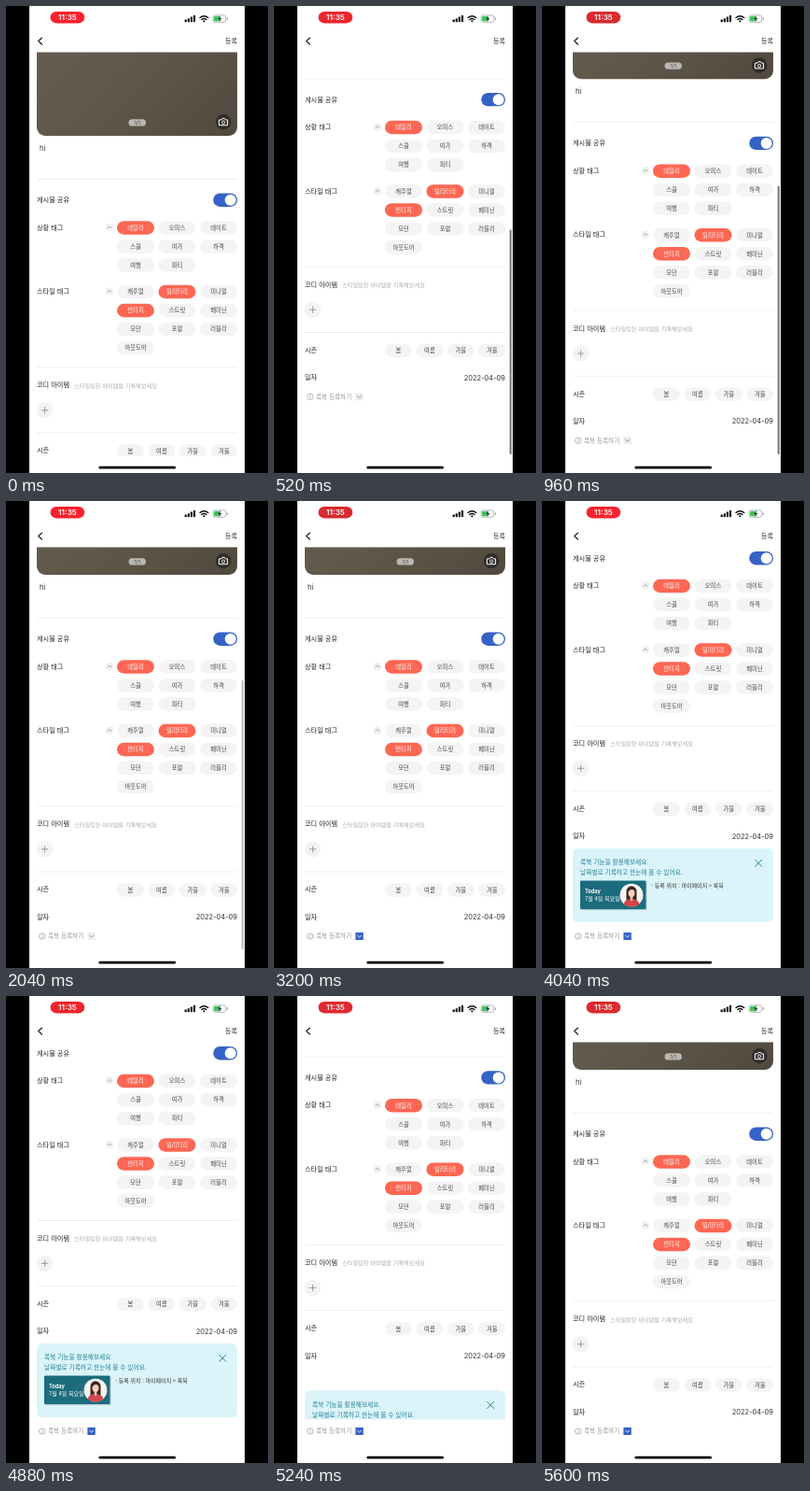
An HTML page for the animation above (5680 ms loop, 281 by 500 pixels).

```html
<!DOCTYPE html>
<html lang="ko">
<head>
<meta charset="utf-8">
<title>등록</title>
<style>
html, body { margin: 0; width: 100%; height: 100%; overflow: hidden; background: #000; }
svg { display: block; width: 100vw; height: 100vh; }
text { font-family: "Noto Sans CJK KR", "Noto Sans CJK", "Noto Sans", sans-serif; white-space: pre; }
text.latin { font-family: Inter, Roboto, sans-serif; }
</style>
</head>
<body>
<svg id="stage" viewBox="0 0 281 500">
  <defs>
    <linearGradient id="photo" x1="0" y1="0" x2="1" y2="1">
      <stop offset="0" stop-color="#6a6254"/>
      <stop offset=".6" stop-color="#5f574a"/>
      <stop offset="1" stop-color="#51493d"/>
    </linearGradient>
    <clipPath id="viewport"><rect x="25" y="49.5" width="231" height="432.5"/></clipPath>
    <clipPath id="fold"><rect id="foldBox" x="25" y="306" width="231" height="0"/></clipPath>
    <clipPath id="face"><circle cx="96" cy="50" r="12.6"/></clipPath>
  </defs>
</svg>
<script>
const LOOP = 5680;
const PANEL = 86.5;
const REST = 147.5;
const NS = 'http://www.w3.org/2000/svg';
const stage = document.getElementById('stage');
const foldBox = document.getElementById('foldBox');

function el(parent, tag, attrs = {}) {
  const node = document.createElementNS(NS, tag);
  for (const key in attrs) node.setAttribute(key, attrs[key]);
  return parent.appendChild(node);
}
const rect = (p, x, y, width, height, fill, rx = 0) =>
  el(p, 'rect', { x, y, width, height, fill, rx });
const circle = (p, cx, cy, r, fill) => el(p, 'circle', { cx, cy, r, fill });
const stroke = (p, d, color, width = 1) => el(p, 'path', {
  d, fill: 'none', stroke: color, 'stroke-width': width,
  'stroke-linecap': 'round', 'stroke-linejoin': 'round'
});
// y is the vertical centre of the glyphs
function label(p, x, y, str, size, fill = '#222', opts = {}) {
  const node = el(p, 'text', { x, y: y + size * 0.37, 'font-size': size, fill, ...opts });
  node.textContent = str;
  return node;
}
const MID = { 'text-anchor': 'middle' };
const END = { 'text-anchor': 'end' };
const BOLD = { 'font-weight': 500 };
const LATIN = { class: 'latin' };

function pill(p, x, y, w, str, on) {
  rect(p, x, y - 7.2, w, 14.4, on ? '#fd6753' : '#f4f4f5', 7.2);
  label(p, x + w / 2, y, str, 6.3, on ? '#fff' : '#444', MID);
}
const divider = (p, y) => rect(p, 33, y - 0.4, 215, 0.8, '#ececec');

function tagGroup(p, y, title, tags, chosen) {
  label(p, 33, y - 0.5, title, 7.2, '#222', BOLD);
  circle(p, 111, y - 0.5, 4.3, '#f1f1f2');
  stroke(p, `M109 ${y + 0.4}l2-1.9l2 1.9`, '#888', 0.7);
  tags.forEach((tag, i) =>
    pill(p, 119 + (i % 3) * 44.5, y + Math.floor(i / 3) * 20, 40, tag, chosen.includes(tag)));
}

// Phone screen
rect(stage, 25, 0, 231, 500, '#fff');
const view = el(stage, 'g', { 'clip-path': 'url(#viewport)' });
const list = el(view, 'g');

// Photo and caption
rect(list, 33, -284, 215, 215.5, 'url(#photo)', 9);
rect(list, 131.5, -86.3, 18.5, 7.4, '#b9b7b3', 3.7);
label(list, 140.7, -82.6, '1/1', 5.4, '#4a4742', { ...MID, ...LATIN });
circle(list, 233.2, -83.2, 8.2, '#2f2d2a');
stroke(list, 'M228.8-85.6h2.2l1-1.5h2.4l1 1.5h2.2v5.8h-8.8z', '#fff', 1);
el(list, 'circle', { cx: 233.2, cy: -82.9, r: 1.6, fill: 'none', stroke: '#fff', 'stroke-width': 0.9 });
label(list, 36, -55.5, 'hi', 7.6, '#333', LATIN);
divider(list, -22);

// Share switch
label(list, 33, 0, '게시물 공유', 7.2, '#222', BOLD);
rect(list, 222.3, -7, 25.7, 14.4, '#3562c6', 7.2);
circle(list, 240.7, 0.2, 6, '#fff');

tagGroup(list, 30, '상황 태그',
  ['데일리', '오피스', '데이트', '스쿨', '여가', '하객', '여행', '파티'], ['데일리']);
tagGroup(list, 98.5, '스타일 태그',
  ['캐주얼', '밀리터리', '미니멀', '빈티지', '스트릿', '페미닌', '모던', '포멀', '러블리', '아웃도어'],
  ['밀리터리', '빈티지']);
divider(list, 179.3);

// Items, season, date
label(list, 33, 198.3, '코디 아이템', 7.2, '#222', BOLD);
label(list, 73, 199, '스타일링한 아이템을 기록해보세요', 6.2, '#aaa');
circle(list, 41.6, 225.3, 8.7, '#f3f3f4');
stroke(list, 'M38.4 225.3h6.4M41.6 222.1v6.4', '#888', 0.8);
divider(list, 249.5);
label(list, 33, 268.3, '시즌', 7.2, '#222', BOLD);
['봄', '여름', '가을', '겨울'].forEach((s, i) => pill(list, 119 + i * 33.4, 269, 29, s));
label(list, 33, 297.8, '일자', 7.2, '#222', BOLD);
label(list, 248, 298, '2022-04-09', 7.5, '#333', { ...END, ...LATIN });

// Folding hint panel
const fold = el(list, 'g', { 'clip-path': 'url(#fold)' });
const panel = el(fold, 'g');
rect(panel, 33, 0, 215, 79, '#daf4fa', 5.5);
label(panel, 41, 15, '룩북 기능을 활용해보세요.', 6.7, '#267f92');
label(panel, 41, 26, '날짜별로 기록하고 한눈에 볼 수 있어요.', 6.7, '#267f92');
stroke(panel, 'M228.7 12.2l7 7M235.7 12.2l-7 7', '#267f92', 1);
rect(panel, 41.5, 35.2, 71, 31, '#b3ced5', 1);
rect(panel, 41, 34.5, 70.5, 30.5, '#1c6c7d', 1);
label(panel, 46, 46, 'Today', 5.6, '#fff', { 'font-weight': 700, ...LATIN });
label(panel, 46, 54, '7월 4일 목요일', 6, '#fff', BOLD);
const avatar = el(panel, 'g', { 'clip-path': 'url(#face)' });
circle(avatar, 96, 50, 12.6, '#f7f4f0');
el(avatar, 'path', { d: 'M90.5 58V46a5.5 5.8 0 0 1 11 0V58z', fill: '#3a2425' });
el(avatar, 'path', { d: 'M87 64q0-9 6-9.6h6q6 .6 6 9.6z', fill: '#d2474b' });
rect(avatar, 94.6, 50, 2.8, 6, '#efc2a6', 1.2);
el(avatar, 'ellipse', { cx: 96, cy: 47.6, rx: 3.5, ry: 4.4, fill: '#f6d0b6' });
el(avatar, 'path', { d: 'M92 47q.3-5 4-5t4 5q-1-3-3.5-3.2Q94 44 92 47z', fill: '#3a2425' });
label(panel, 117, 40, '- 등록 위치 : 마이페이지 > 룩북', 6, '#333');

// Lookbook row
const row = el(list, 'g');
el(row, 'circle', { cx: 38.8, cy: 318.5, r: 3.2, fill: 'none', stroke: '#999', 'stroke-width': 0.7 });
stroke(row, 'M38.8 318.2v1.9M38.8 316.8v.1', '#999', 0.7);
label(row, 45, 318.5, '룩북 등록하기', 6.6, '#999');
const box = rect(row, 87.4, 314.4, 8.4, 8.2, '#eee', 0.6);
const tick = stroke(row, 'M89.6 317.7l2 1.9l2-1.9', '#888', 0.9);

const bar = rect(stage, 252.7, 0, 2.1, 0, '#777', 1);

// Header
stroke(stage, 'M38.4 34.2l-3.7 3.4l3.7 3.4', '#222', 1.3);
label(stage, 248, 37.3, '등록', 7.1, '#333', END);

// Status bar
const clock = rect(stage, 47.6, 6, 36.6, 12.4, '#fc222d', 6.2);
label(stage, 66, 12.2, '11:35', 8.2, '#fff', { ...MID, ...LATIN, 'font-weight': 600 });
[2.6, 4, 5.6, 7.2].forEach((h, i) => rect(stage, 191.6 + i * 3.1, 17.2 - h, 2.2, h, '#111', 0.6));
stroke(stage, 'M208 12.6q4.4-3.9 8.8 0', '#111', 1.4);
stroke(stage, 'M209.8 14.6q2.6-2.3 5.2 0', '#111', 1.3);
circle(stage, 212.4, 16.3, 1.1, '#111');
el(stage, 'rect', { x: 222, y: 9.9, width: 13.8, height: 7.4, rx: 2.2, fill: '#fff', stroke: '#999', 'stroke-width': 0.7 });
rect(stage, 223, 10.9, 7.2, 5.4, '#35c759', 1.3);
rect(stage, 236.8, 12.3, 1, 2.6, '#999', 0.5);
el(stage, 'path', { d: 'M230.2 9.6l-3.4 4.6h2.1l-1 3.6l3.6-4.8h-2.2z', fill: '#111', stroke: '#fff', 'stroke-width': 0.3 });

// Home indicator
rect(stage, 99.5, 492.8, 82.5, 2.8, '#000', 1.4);

// Fling past the end, then a spring back: [ms, y of the share row]
const SCROLL = [[0, 207.5], [80, 204], [200, 175], [320, 136], [440, 108], [520, 100], [580, 98.5],
  [660, 110], [740, 128], [840, 141], [960, 146.7], [1200, REST], [LOOP, REST]];
const BAR = [[0, 0], [60, 0], [160, 1], [1840, 1], [2240, 0], [3220, 0], [3320, 1], [3660, 1], [3980, 0], [LOOP, 0]];

function segment(steps, t) {
  let i = 0;
  while (i < steps.length - 2 && t >= steps[i + 1][0]) i++;
  return i;
}
function linear(steps, t) {
  const i = segment(steps, t), [a, va] = steps[i], [b, vb] = steps[i + 1];
  return va + (vb - va) * (t - a) / (b - a);
}
function smooth(steps, t) {
  const i = segment(steps, t), [a, va] = steps[i], [b, vb] = steps[i + 1];
  const slope = k => (steps[k + 1][1] - steps[k][1]) / (steps[k + 1][0] - steps[k][0]);
  const tangent = k => {
    if (k === 0 || k === steps.length - 1) return 0;
    const l = slope(k - 1), r = slope(k);
    return l * r <= 0 ? 0 : 2 * l * r / (l + r);
  };
  const d = b - a, u = (t - a) / d, v = 1 - u;
  return va * (1 + 2 * u) * v * v + tangent(i) * d * u * v * v
    + vb * u * u * (3 - 2 * u) - tangent(i + 1) * d * u * u * v;
}
function ease(t, start, span) {
  const u = Math.min(1, Math.max(0, (t - start) / span));
  return (1 - Math.cos(Math.PI * u)) / 2;
}

function draw(t) {
  const base = smooth(SCROLL, t);
  const open = PANEL * (ease(t, 3220, 380) - ease(t, 5100, 380));
  list.setAttribute('transform', `translate(0 ${base - open})`);
  foldBox.setAttribute('height', open);
  panel.setAttribute('transform', `translate(0 ${311 + (PANEL - open) * 0.92})`);
  row.setAttribute('transform', `translate(0 ${open})`);

  const active = t >= 2840;
  box.setAttribute('fill', active ? '#3360c6' : '#eee');
  tick.setAttribute('stroke', active ? '#fff' : '#888');

  const over = Math.max(0, REST - base), above = Math.max(0, base - REST);
  const length = 288 - over - open * 0.4;
  bar.setAttribute('y', 480 - length - above * 0.67);
  bar.setAttribute('height', length);
  bar.setAttribute('opacity', linear(BAR, t));

  const glow = (1 + Math.cos(2 * Math.PI * t / 2200)) / 2;
  const mix = (a, b) => Math.round(a + (b - a) * glow);
  clock.setAttribute('fill', `rgb(${mix(217, 252)},${mix(42, 34)},${mix(46, 45)})`);
}

const start = performance.now();
function tickFrame() {
  draw((performance.now() - start) % LOOP);
  requestAnimationFrame(tickFrame);
}
tickFrame();
</script>
</body>
</html>
```
